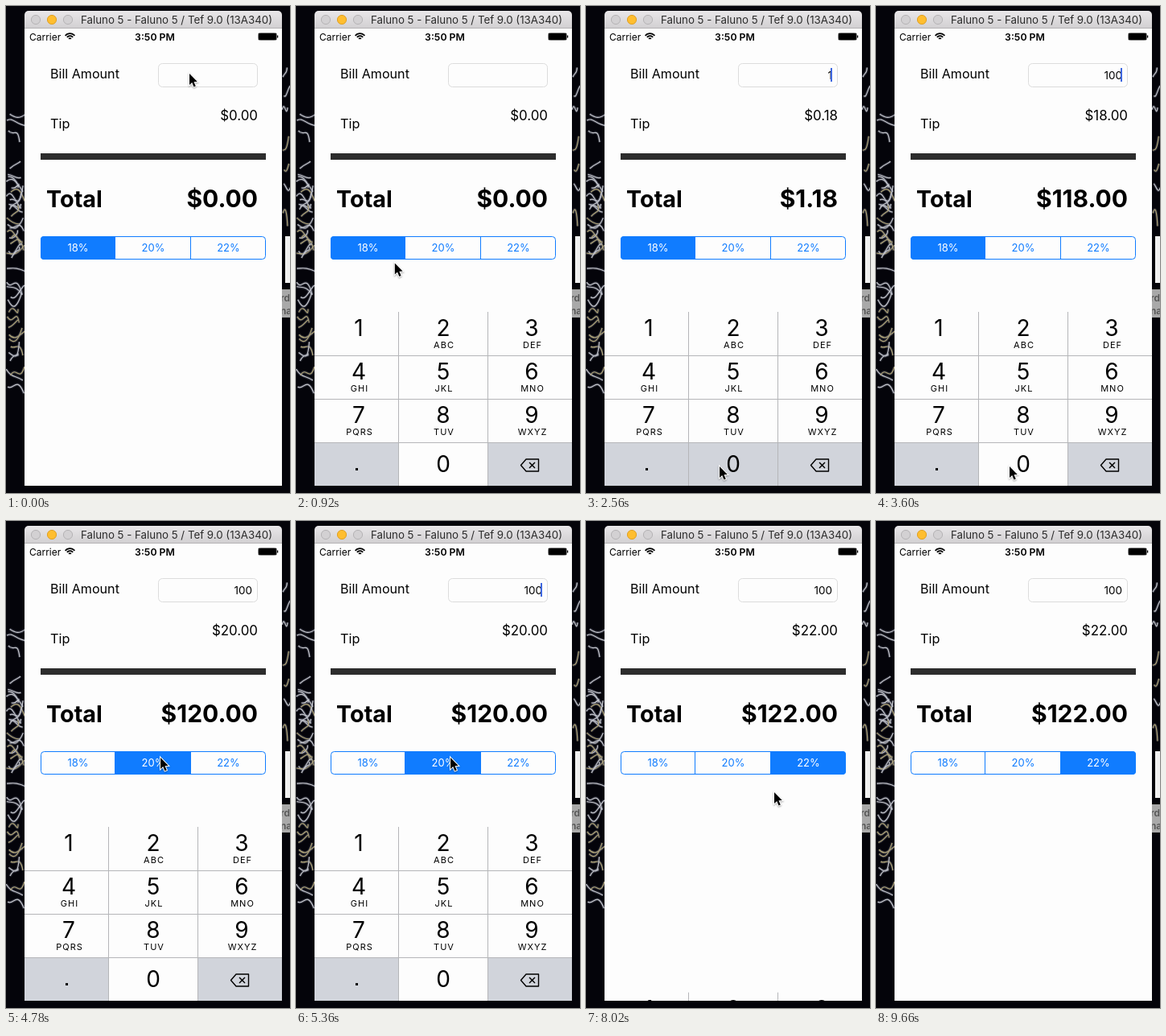
An HTML page with a canvas for the animation above (9810 ms loop, 353 by 605 pixels).

```html
<!DOCTYPE html>
<html lang="en">
<head>
<meta charset="utf-8">
<title>Tip calculator</title>
<style>
html, body { margin: 0; width: 100%; height: 100%; overflow: hidden; background: #04040a; }
canvas { display: block; }
</style>
</head>
<body>
<canvas id="stage" width="353" height="605"></canvas>
<script>
const ctx = document.getElementById('stage').getContext('2d');
const LOOP = 9810, START = 180, STEP = 148;
const BLUE = '#107cff', GREY = '#d1d4db', RULE = '#b5b6b9', PAPER = '#fdfdfd';

// User actions, in ms
const FOCUS = 320, PICK_20 = 4760, PICK_22 = 6390, DISMISS = 7460;
const typing = [
  { time: 1500, bill: '1', key: '1' },
  { time: 2690, bill: '10', key: '0' },
  { time: 3130, bill: '100', key: '0' }
];
const caretResets = [FOCUS, ...typing.map(t => t.time)];

const spots = {
  field: [228, 84], one: [86, 402], zero: [166, 572], mid: [192, 294],
  right: [264, 295], blank: [234, 337], away: [306, 640]
};
const moves = [
  { to: 'one', from: 340, until: 1210 },
  { to: 'zero', from: 1650, until: 2400 },
  { to: 'mid', from: 3580, until: 4180 },
  { to: 'right', from: 5500, until: 6250 },
  { to: 'blank', from: 6690, until: 7280 },
  { to: 'away', from: 9200, until: 9650 }
];

const rates = [18, 20, 22];
const keys = ['1', '2ABC', '3DEF', '4GHI', '5JKL', '6MNO', '7PQRS', '8TUV', '9WXYZ', '.', '0', '<'];

const clamp = v => Math.min(1, Math.max(0, v));
const ease = p => p * p * (3 - 2 * p);
const progress = (now, from, until) => ease(clamp((now - from) / (until - from)));

function randomizer(seed) {
  return () => (seed = seed * 16807 % 2147483647) / 2147483647;
}

function rect(x, y, w, h, fill) {
  ctx.fillStyle = fill;
  ctx.fillRect(x, y, w, h);
}

function rounded(x, y, w, h, r) {
  ctx.beginPath();
  ctx.roundRect(x, y, w, h, r);
}

function stroke(color, width = 1) {
  ctx.strokeStyle = color;
  ctx.lineWidth = width;
  ctx.stroke();
}

function trace(points, closed) {
  ctx.beginPath();
  points.forEach(p => ctx.lineTo(...p));
  if (closed) ctx.closePath();
}

function text(str, x, y, size, { weight = 400, align = 'left', color = '#000', spacing = 0 } = {}) {
  ctx.font = `${weight} ${size}px Inter, sans-serif`;
  ctx.letterSpacing = spacing + 'px';
  ctx.textAlign = align;
  ctx.fillStyle = color;
  ctx.fillText(str, x, y);
}

function scribbles(left, width, top, height, count, random) {
  for (let i = 0; i < count; i++) {
    const y = top + height * (i + random()) / count;
    const x = left + random() * width * .3;
    const jitter = size => (random() - .5) * size;
    ctx.beginPath();
    ctx.moveTo(x, y);
    ctx.bezierCurveTo(x + width * .3, y + jitter(30), x + width * .5, y + jitter(30),
      left + width * (.6 + random() * .5), y + jitter(36));
    stroke('rgba(125,130,150,.3)', 3.5);
    stroke(random() < .3 ? '#b3a778' : '#c6c8ce', 1.2);
  }
}

function desktop() {
  rect(0, 0, 353, 605, '#04040a');
  const random = randomizer(4711);
  scribbles(0, 23, 134, 22, 3, random);
  scribbles(0, 23, 200, 115, 22, random);
  scribbles(0, 23, 325, 150, 16, random);
  scribbles(343, 10, 70, 195, 7, random);
  rect(347, 286, 6, 58, '#f1f1f1');
  rect(343, 352, 10, 35, '#a9a9a9');
  text('rd', 341, 367, 12, { weight: 600, color: '#555' });
  text('na', 341, 383, 12, { weight: 600, color: '#555' });
}

function titleBar() {
  const shade = ctx.createLinearGradient(0, 6, 0, 28);
  shade.addColorStop(0, '#e9e7e9');
  shade.addColorStop(1, '#d1cfd1');
  rounded(23, 6, 320, 24, [5, 5, 0, 0]);
  ctx.fillStyle = shade;
  ctx.fill();
  rect(23, 27, 320, 1, '#b4b2b4');
  for (let i = 0; i < 3; i++) {
    ctx.beginPath();
    ctx.arc(37 + i * 20, 17, 5.6, 0, 7);
    ctx.fillStyle = i === 1 ? '#ffbe2f' : '#d3d1d3';
    ctx.fill();
    stroke(i === 1 ? '#dfa023' : '#b5b3b5');
  }
  text('Faluno 5 - Faluno 5 / Tef 9.0 (13A340)', 212, 22, 13.3, { align: 'center', color: '#2b2b2b' });
}

function statusBar() {
  text('Carrier', 29, 43, 12);
  text('3:50 PM', 185, 43, 12.3, { weight: 600, align: 'center' });
  [7.8, 4.8, 1.8].forEach(r => {
    ctx.beginPath();
    ctx.arc(79.5, 42, r, -Math.PI * .77, -Math.PI * .23);
    stroke('#000', 1.8);
  });
  rounded(313.5, 33.5, 23, 9, 2);
  stroke('#8a8a8a');
  rect(314, 34, 22, 8, '#000');
  rect(337, 36.5, 1.2, 3, '#000');
}

function segments(choice) {
  const edge = i => Math.round(43 + i * 280 / 3);
  ctx.save();
  rounded(43, 286, 280, 29, 4);
  ctx.clip();
  rect(edge(choice) - 1, 286, edge(choice + 1) - edge(choice) + 1, 29, BLUE);
  ctx.restore();
  rounded(43.5, 286.5, 279, 28, 4);
  stroke(BLUE);
  rates.forEach((rate, i) => {
    if (i) rect(edge(i) - 1, 286, 1, 29, BLUE);
    text(rate + '%', 89.5 + i * 93.5, 305, 13, { align: 'center', color: i === choice ? '#fff' : BLUE });
  });
}

function calculator(bill, choice, caret) {
  const amount = Number(bill), tip = amount * rates[choice] / 100;
  const money = v => '$' + v.toFixed(2);
  text('Bill Amount', 55, 90, 16.1);
  rounded(189.5, 71.5, 123, 29, 5);
  stroke('#dcdcdc');
  text(bill, 306, 91, 13.5, { align: 'right' });
  if (caret) rect(304, 77, 2, 17, '#3f68e0');
  text('Tip', 55, 152, 16.3);
  text(money(tip), 313, 142, 16.9, { align: 'right' });
  rect(43, 183, 280, 8, '#2d2d2d');
  text('Total', 50, 249.5, 28.8, { weight: 700 });
  text(money(amount + tip), 313, 249.5, 30, { weight: 700, align: 'right' });
  segments(choice);
}

function deleteIcon(x, y) {
  trace([[x - 11.5, y], [x - 5, y - 7.5], [x + 10.5, y - 7.5], [x + 10.5, y + 7.5], [x - 5, y + 7.5]], true);
  ctx.lineJoin = 'round';
  stroke('#000', 1.4);
  [-1, 1].forEach(s => {
    trace([[x - 1, y - 3.5 * s], [x + 6, y + 3.5 * s]]);
    stroke('#000', 1.4);
  });
}

function keyboard(shift, pressed) {
  if (shift >= 1) return;
  ctx.save();
  ctx.beginPath();
  ctx.rect(23, 28, 320, 568);
  ctx.clip();
  ctx.translate(0, shift * 216);
  rect(23, 380, 320, 216, PAPER);
  const edges = [23, 127, 238, 343], centers = [78, 183, 293];
  keys.forEach((key, i) => {
    const column = i % 3, left = edges[column], mid = centers[column];
    const top = 380 + Math.floor(i / 3) * 54, label = key[0];
    const special = label === '.' || label === '<';
    if (special || label === pressed) rect(left, top, edges[column + 1] - left, 54, GREY);
    if (label === '<') deleteIcon(291, 570.5);
    else if (label === '.') rect(74, 574, 3, 3, '#000');
    else text(label, mid, top + (label === '0' ? 37 : 30), 28, { align: 'center' });
    text(key.slice(1), mid + 1, top + 45, 11, { align: 'center', spacing: 1 });
  });
  for (let i = 1; i < 4; i++) rect(23, 380 + i * 54, 320, 1, RULE);
  edges.slice(1, 3).forEach(x => rect(x, 380, 1, 216, RULE));
  ctx.restore();
}

function pointerAt(now) {
  return moves.reduce(([x, y], { to, from, until }) => {
    const p = progress(now, from, until), [tx, ty] = spots[to];
    return [x + (tx - x) * p, y + (ty - y) * p];
  }, spots.field);
}

function pointer(x, y) {
  ctx.save();
  ctx.translate(x, y);
  ctx.shadowColor = 'rgba(0,0,0,.35)';
  ctx.shadowBlur = 2;
  ctx.shadowOffsetY = 1;
  trace([[0, 0], [0, 14], [3.2, 11], [5.5, 16.5], [7.8, 15.5], [5.5, 10.2], [9.8, 10]], true);
  stroke('#fff', 2);
  ctx.shadowColor = 'transparent';
  ctx.fillStyle = '#000';
  ctx.fill();
  ctx.restore();
}

function caretVisible(now) {
  const reset = caretResets.filter(t => t <= now).pop();
  return reset !== undefined && now < DISMISS && (now - reset) % 1000 < 480;
}

function draw(time) {
  const now = time < START ? 0 : START + Math.floor((time - START + 3) / STEP) * STEP;
  const typed = typing.filter(t => t.time <= now).pop();
  const held = typing.find(t => now < t.time && now >= t.time - STEP);
  const choice = (now >= PICK_20) + (now >= PICK_22);
  const shift = 1 - progress(now, FOCUS - 100, FOCUS + 450) + progress(now, DISMISS, DISMISS + 650);

  desktop();
  titleBar();
  rect(23, 28, 320, 568, PAPER);
  statusBar();
  calculator(typed ? typed.bill : '', choice, caretVisible(now));
  keyboard(shift, held && held.key);
  pointer(...pointerAt(now));
}

function loop() {
  draw(performance.now() % LOOP);
  requestAnimationFrame(loop);
}
loop();
</script>
</body>
</html>
```
